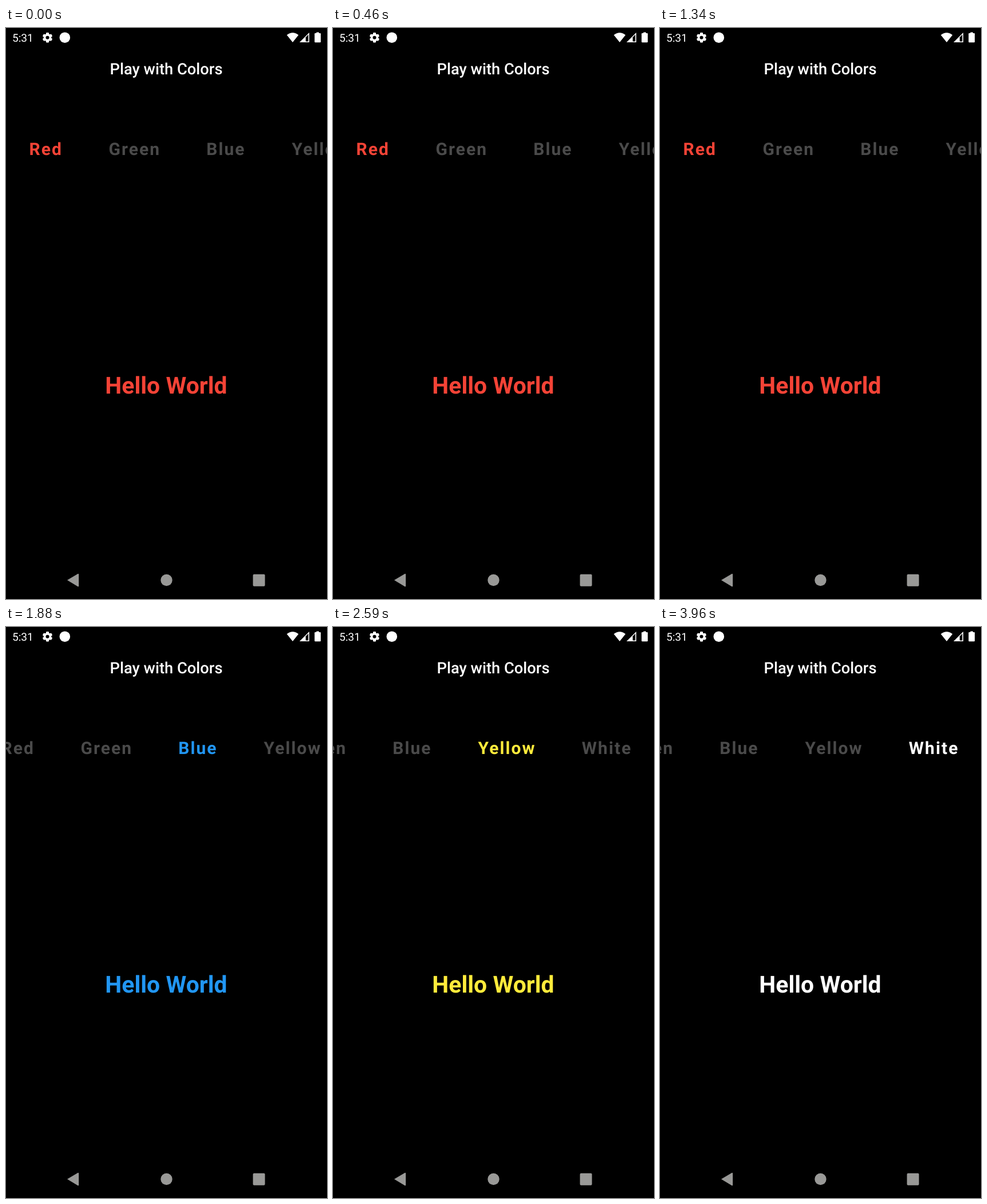
These frames come from a looping animation (561 by 998 pixels, 4210 ms). An HTML page with a canvas:

```html
<!DOCTYPE html>
<html lang="en">
<head>
<meta charset="utf-8">
<title>Play with Colors</title>
<style>
  html, body { margin: 0; width: 100%; height: 100%; overflow: hidden; background: #000; }
  canvas { display: block; width: 561px; height: 998px; }
</style>
</head>
<body>
<canvas id="stage"></canvas>
<script>
const WIDTH = 561, HEIGHT = 998, LOOP = 4210;
const IDLE = '#4a4a4a', NAV = '#999997', WHITE = '#fff';
const FONT = 'Roboto, sans-serif';

const tabs = [
  { label: 'Red', x: 40.5, color: '#f44336', start: 0 },
  { label: 'Green', x: 179.6, color: '#4caf50', start: 1380 },
  { label: 'Blue', x: 350.3, color: '#2196f3', start: 1880 },
  { label: 'Yellow', x: 499.5, color: '#ffeb3b', start: 2590 },
  { label: 'White', x: 680.8, color: '#ffffff', start: 3290 }
];

const canvas = document.getElementById('stage');
const ctx = canvas.getContext('2d');
const ratio = window.devicePixelRatio || 1;
canvas.width = WIDTH * ratio;
canvas.height = HEIGHT * ratio;
ctx.scale(ratio, ratio);
ctx.textRendering = 'geometricPrecision'; // fractional glyph positions

function scrollAt(time) {
  if (time < 1880) return 0;
  if (time >= 2590) return 246;
  const p = Math.min(1, Math.max(0, (time - 1960) / 80));
  return 49 + 54.5 * (1 - (1 - p) ** 2);
}

function text(str, x, y, font, color, align = 'left', spacing = 0) {
  ctx.font = `${font} ${FONT}`;
  ctx.textAlign = align;
  ctx.letterSpacing = `${spacing}px`;
  ctx.fillStyle = color;
  ctx.fillText(str, x, y);
}

function disc(x, y, r, color) {
  ctx.fillStyle = color;
  ctx.beginPath();
  ctx.arc(x, y, r, 0, Math.PI * 2);
  ctx.fill();
}

function polygon(color, ...points) {
  ctx.fillStyle = color;
  ctx.beginPath();
  points.forEach(([x, y]) => ctx.lineTo(x, y));
  ctx.closePath();
  ctx.fill();
}

function box(x, y, w, h, r, color) {
  ctx.fillStyle = color;
  ctx.beginPath();
  ctx.roundRect(x, y, w, h, r);
  ctx.fill();
}

function gear(x, y) {
  ctx.save();
  ctx.translate(x, y);
  for (let i = 0; i < 6; i++) {
    polygon(WHITE, [-3.2, -5], [-2, -8.7], [2, -8.7], [3.2, -5]);
    ctx.rotate(Math.PI / 3);
  }
  ctx.restore();
  disc(x, y, 6.5, WHITE);
  disc(x, y, 3, '#000');
}

function wifi() {
  ctx.fillStyle = WHITE;
  ctx.beginPath();
  ctx.moveTo(501, 25);
  ctx.lineTo(490.8, 12.2);
  ctx.quadraticCurveTo(501, 4.2, 511.2, 12.2);
  ctx.closePath();
  ctx.fill();
}

function statusBar() {
  text('5:31', 11, 24, '400 19.1px', WHITE);
  gear(72.5, 16.7);
  disc(102.8, 16.7, 9.3, WHITE);
  wifi();
  polygon(WHITE, [513, 25], [530, 25], [530, 8]);
  polygon('#000', [523.8, 23.4], [523.8, 16.2], [528.4, 11.6], [528.4, 23.4]);
  box(539.3, 9, 10.8, 16.2, 1.3, WHITE);
  box(542.4, 7.4, 4.6, 3, 0.5, WHITE);
}

function navBar() {
  polygon(NAV, [107, 965], [126, 953.7], [127.2, 954.5], [127.2, 975.7], [126, 976.5]);
  disc(280.5, 965, 10.2, NAV);
  box(431.6, 954.7, 21, 21, 2, NAV);
}

function draw(time) {
  const active = tabs.filter(tab => tab.start <= time).pop();
  const scroll = scrollAt(time);

  ctx.fillStyle = '#000';
  ctx.fillRect(0, 0, WIDTH, HEIGHT);
  statusBar();
  text('Play with Colors', 280, 81, '500 27.3px', WHITE, 'center');
  for (const tab of tabs) {
    text(tab.label, tab.x - scroll, 221.5, '700 30px',
      tab === active ? tab.color : IDLE, 'left', 2.05);
  }
  text('Hello World', 280, 638.6, '700 40.94px', active.color, 'center');
  navBar();
}

const begin = performance.now();
function tick() {
  draw((performance.now() - begin) % LOOP);
  requestAnimationFrame(tick);
}
tick();
</script>
</body>
</html>
```
